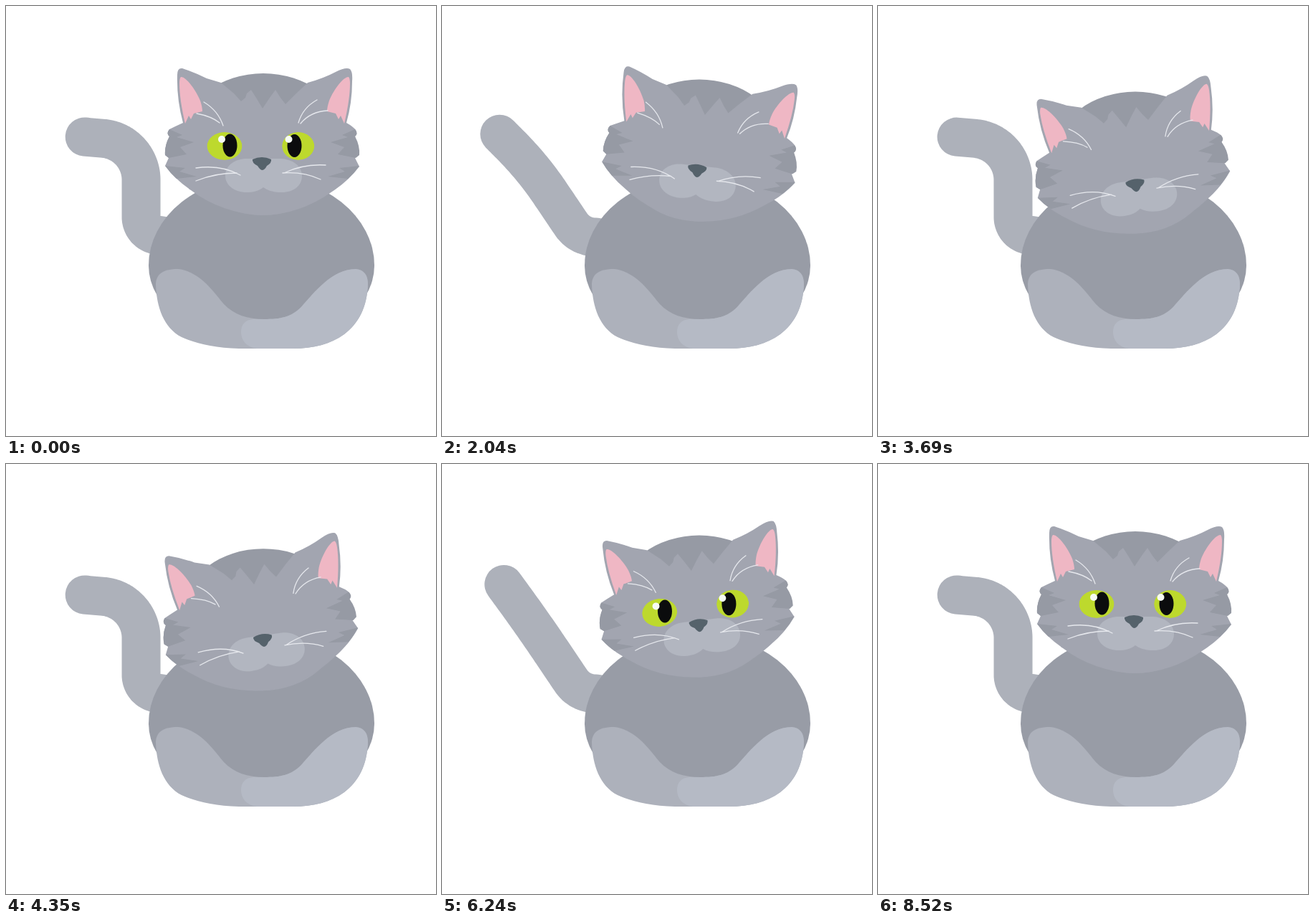
An HTML page that plays this animation: 600x600 px, repeating every 8970 ms.

```html
<!DOCTYPE html>
<html lang="en">
<head>
<meta charset="utf-8">
<title>Sleepy cat</title>
<style>
  html, body { margin: 0; width: 100%; height: 100%; overflow: hidden; background: #fff; }
  svg { display: block; width: 100vw; height: 100vh; }
  .light { fill: #a2a5b0; }
  .dark { fill: #969aa4; }
  .pink { fill: #efb7c4; }
  .iris { fill: #bdd92d; }
  .pupil { fill: #0b0c0d; }
  .glint { fill: #f6fbf4; }
  .whisker { fill: none; stroke: #e6e8ed; stroke-width: 1.3; stroke-linecap: round; }
</style>
</head>
<body>
<svg viewBox="0 0 600 600">
  <defs>
    <clipPath id="clipL"><path id="lidL"/></clipPath>
    <clipPath id="clipR"><path id="lidR"/></clipPath>
  </defs>

  <path id="tail" fill="none" stroke="#adb1ba" stroke-width="54" stroke-linecap="round" stroke-linejoin="round"/>

  <path fill="#989ca6" d="M199 362A157.5 125 0 0 1 514 362A157.5 110 0 0 1 199 362Z"/>
  <path fill="#adb1bb" d="M209 388C210 373 220 367 240 367C270 370 290 399 304 416C318 431 338 437 360 437C384 437 398 434 412 420
    C430 400 455 367 488 367C500 368 505 376 505 388C504 420 492 443 472 458C452 472 430 478 400 478H325C290 477 262 470 245 462C220 449 210 420 209 388Z"/>
  <path fill="#b5bac5" d="M345 437H360C384 437 398 434 412 420C430 400 455 367 488 367C500 368 505 376 505 388
    C504 420 492 443 472 458C452 472 430 478 400 478H350C335 476 328 466 328 455C328 445 333 438 345 437Z"/>

  <g id="skull">
    <ellipse class="dark" cx="359" cy="179" rx="110" ry="85"/>
    <path class="light" d="M246 193a112 99 0 0 0 224 0z"/>
  </g>

  <g id="head">
    <path class="light" d="M300 107L318 122L328 133L334 128L336 122L342 117L349 128L358 143L368 128L376 117L383 128L390 137L405 122L421 107
      Q443 101 460 92Q474 85 480 88Q484 92 483 105Q483 135 475 163Q484 168 488 173Q491 179 487 182Q491 196 490 206L487 212L493 224
      Q478 244 455 259Q410 291 358 292Q300 289 258 257Q236 242 222 223L227 212L222 208Q221 195 228 182Q223 178 228 172Q236 168 247 163
      Q238 130 239 96Q239 86 246 87Q262 92 280 101Z"/>
    <g id="markings">
      <path class="dark" d="M228 172L246 180L238 183L262 190L243 197L252 207L227 212L222 208Q221 195 228 182Q223 178 228 172Z"/>
      <path class="dark" d="M222 223L250 226L242 231L266 238L238 241Q229 233 222 223Z"/>
    </g>
    <use href="#markings" transform="matrix(-1 0 0 1 715 0)"/>

    <path id="earIn" class="pink" d="M244 99C250 98 264 115 271 132Q274 141 274 147L262 150L258 158L255 153L250 164Q242 130 242 108Q242 101 244 99Z"/>
    <use href="#earIn" transform="matrix(-1 0 0 1 722 0)"/>

    <g id="face">
      <g clip-path="url(#clipL)">
        <ellipse class="iris" cx="305" cy="195.5" rx="24.5" ry="19.5"/>
        <ellipse class="pupil" cx="312.5" cy="194.5" rx="10" ry="16"/>
        <circle class="glint" cx="301" cy="186" r="5"/>
      </g>
      <g clip-path="url(#clipR)">
        <ellipse class="iris" cx="407.7" cy="195.5" rx="22.5" ry="19.5"/>
        <ellipse class="pupil" cx="402.5" cy="195" rx="10" ry="16"/>
        <circle class="glint" cx="394.5" cy="186" r="5"/>
      </g>
      <g id="muzzle">
        <path fill="#b2b6c0" d="M359 253C350 260 341 260 333 260C317 259 306 249 306 237C306 222 320 213 336 213H384C400 214 413 223 413 237
          C413 251 401 260 385 260C374 260 366 258 359 253Z"/>
        <path fill="#55626b" d="M344 214Q357 208 370 214Q371 219 364 223Q361 229 357 229Q354 228 351 223Q343 219 344 214Z"/>
      </g>
      <path class="whisker" d="M276 134Q296 146 303 167M266 150Q287 154 298 163M434 131Q414 142 408 163M449 146Q425 147 411 164
        M265 226Q300 221 327 236M265 244Q292 233 322 233M446 222Q415 220 388 233M439 242Q415 231 386 233"/>
    </g>
  </g>
</svg>
<script>
const LOOP = 8970, STEP = 30, TAIL_CYCLE = 4800;
const $ = id => document.getElementById(id);
const pupils = document.querySelectorAll(".pupil");

// Sine ease from 0 to 1 between two times.
function ease(t, from, to) {
  const u = Math.min(1, Math.max(0, (t - from) / (to - from)));
  return Math.sin(u * Math.PI / 2) ** 2;
}

// Sum of eased moves, each [from, to, amount].
const travel = moves => t => moves.reduce((sum, [from, to, amount]) => sum + amount * ease(t, from, to), 0);

const tilt = travel([[0, 450, -3.6], [450, 1800, 10.4], [1800, 3500, -14.9],
  [4530, 5415, 14.6], [5415, 6240, -13.4], [6240, 7200, 6.9]]);
const drop = travel([[900, 1320, 3], [1700, 2730, 22.5], [4100, 5600, -20], [6240, 7200, -5.5]]);
const muzzleDrop = travel([[1600, 2730, 5], [3690, 4900, -5]]);
const closure = travel([[900, 1550, 2], [5200, 5800, -2]]);

// The tail leaves the body to the left, bends upwards, then curls over near the tip.
function tailPath(t) {
  const lean = ease(t, 0, 900) - ease(t, 2500, 3720);
  const curl = 1 - ease(t, 0, 1600) + ease(t, 1600, 3500);
  const middle = 90 + 34 * lean, length = 203 - 18 * lean * curl, step = 3;
  let x = 214, y = 320 + 20 * lean * curl;
  let d = `M240 ${y + 4}L${x} ${y}`;
  for (let s = step / 2; s < length; s += step) {
    const bend = Math.min(1, s / 40);
    const over = Math.min(1, Math.max(0, (s - 92) / 86));
    const angle = (180 + (middle - 180) * bend + 85 * curl * over) * Math.PI / 180;
    x += step * Math.cos(angle);
    y -= step * Math.sin(angle);
    d += `L${x.toFixed(2)} ${y.toFixed(2)}`;
  }
  return d;
}

// Open part of an eye; lid runs from -1 (wide open) to 1 (shut).
function eyeOpening(cx, cy, rx, ry, lid) {
  if (lid > 0.995) return "M0 0";
  const edge = Math.abs(lid) * ry, sweep = lid < 0 ? 1 : 0;
  return `M${cx - rx} ${cy}A${rx} ${edge} 0 0 ${sweep} ${cx + rx} ${cy}A${rx} ${ry} 0 0 1 ${cx - rx} ${cy}Z`;
}

function draw(t) {
  const y = drop(t), angle = tilt(t), lid = closure(t) - 1;
  $("tail").setAttribute("d", tailPath(t % TAIL_CYCLE));
  $("skull").setAttribute("transform", `translate(0 ${y})`);
  $("head").setAttribute("transform", `translate(0 ${y}) rotate(${angle} 358 227)`);
  $("face").setAttribute("transform", `translate(${-0.3 * angle} 0)`);
  $("muzzle").setAttribute("transform", `translate(0 ${muzzleDrop(t)})`);
  $("lidL").setAttribute("d", eyeOpening(305, 195.5, 24.6, 19.6, lid));
  $("lidR").setAttribute("d", eyeOpening(407.7, 195.5, 22.6, 19.6, lid));
  for (const p of pupils)
    p.setAttribute("transform", `rotate(${-angle} ${p.getAttribute("cx")} ${p.getAttribute("cy")})`);
}

const start = performance.now();
function tick() {
  const t = (performance.now() - start) % LOOP;
  draw(Math.floor(t / STEP) * STEP);
  requestAnimationFrame(tick);
}
draw(0);
requestAnimationFrame(tick);
</script>
</body>
</html>
```
